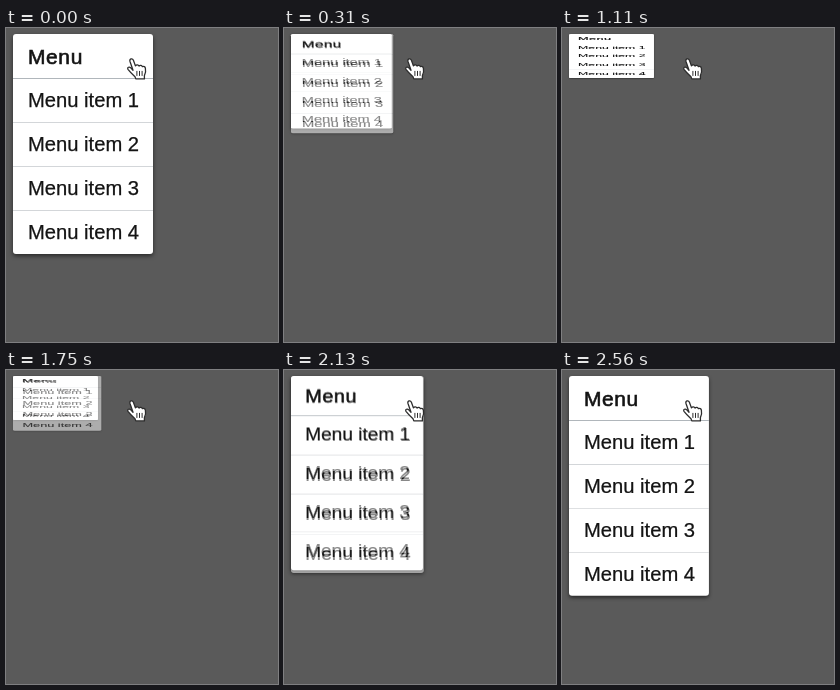
An HTML page that plays this animation: 272 by 314 pixels, repeating every 2.59 s.

```html
<!DOCTYPE html>
<html lang="en">
<head>
<meta charset="utf-8">
<title>Menu</title>
<style>
  html, body {
    margin: 0;
    width: 100%;
    height: 100%;
    overflow: hidden;
    background: #5a5a5a;
  }
  .menu {
    position: absolute;
    left: 7px;
    top: 6px;
    width: 140px;
    border-radius: 3px;
    background: #fff;
    box-shadow: 0 2px 4px rgba(0, 0, 0, .55);
    color: #141414;
    font: 20.2px/45.5px "Liberation Sans", Arial, sans-serif;
    -webkit-text-stroke: .25px #141414;
    white-space: nowrap;
    transform-origin: 0 0;
    filter: blur(.3px);
  }
  .menu div {
    box-sizing: border-box;
    height: 44px;
    padding-left: 15px;
  }
  .title {
    font-size: 21px;
    letter-spacing: .6px;
    -webkit-text-stroke-width: .6px;
  }
  .item { box-shadow: inset 0 1px #d3d6d9; }
  .title + .item { box-shadow: inset 0 1px #b0b6bb; }
  .ghost { opacity: .5; }
  svg {
    position: absolute;
    left: 0;
    top: 0;
  }
</style>
</head>
<body>
<div class="menu">
  <div class="title">Menu</div>
  <div class="item">Menu item 1</div>
  <div class="item">Menu item 2</div>
  <div class="item">Menu item 3</div>
  <div class="item">Menu item 4</div>
</div>
<svg width="272" height="314" fill="none" stroke="#2c2c2c" stroke-linejoin="round" stroke-linecap="round">
  <g transform="translate(-.6 -.7)">
    <path fill="#fff" stroke-width="1.3" d="M127.6 43 L124.6 34.2 C123.8 31.4 127 30.6 128 33 L130 38.6
      C131 37.2 133 37.4 133.6 38.8 C134.8 37.6 136.4 38 137 39.4 C138.4 38.6 139.8 39.4 140 41
      C140.6 44 140.4 46 139 48.4 V51.6 H130.4 L129.6 49.4 C127 47 124.6 44.6 122.6 42
      C121.4 40 124 39 125.4 40.6 Z"/>
    <path stroke-width="1" d="M131.5 44v4.2M134.1 44v4.2M136.7 44v4.2"/>
  </g>
</svg>
<script>
  const LOOP = 2590, COLLAPSE = 80, EXPAND = 1750;
  const STEP = 46, SHUTTER = 1000 / 60;
  const CLOSED_X = .607, CLOSED_Y = .2;

  const menu = document.querySelector('.menu');
  const ghost = menu.cloneNode(true);
  ghost.classList.add('ghost');
  menu.after(ghost);

  const remaining = v => (1 - Math.min(1, Math.max(0, v))) ** 4;
  const collapsing = t => remaining((t - 42) / 1000);
  const expanding = t => 1 - remaining((t - 1735) / 960);

  // The picture advances in steps, not on every refresh.
  const snap = (t, start) => start + Math.max(0, Math.floor((t - start + 2) / STEP)) * STEP;

  function pose(el, open) {
    const x = CLOSED_X + (1 - CLOSED_X) * open;
    const y = CLOSED_Y + (1 - CLOSED_Y) * open;
    el.style.transform = `scale(${x}, ${y})`;
  }

  function draw(now) {
    const t = now % LOOP;
    let small = 1, large = 1;
    if (t >= EXPAND) {
      const s = snap(t, EXPAND);
      small = expanding(s - SHUTTER);
      large = expanding(s);
    } else if (t >= COLLAPSE) {
      const s = snap(t, COLLAPSE);
      small = collapsing(s);
      large = collapsing(s - SHUTTER);
    }
    // The larger pose at half strength over the smaller one averages the two.
    pose(menu, small);
    pose(ghost, large);
    ghost.style.visibility = large - small > .001 ? 'visible' : 'hidden';
  }

  const begin = performance.now();
  function tick() {
    draw(performance.now() - begin);
    requestAnimationFrame(tick);
  }
  tick();
</script>
</body>
</html>
```
